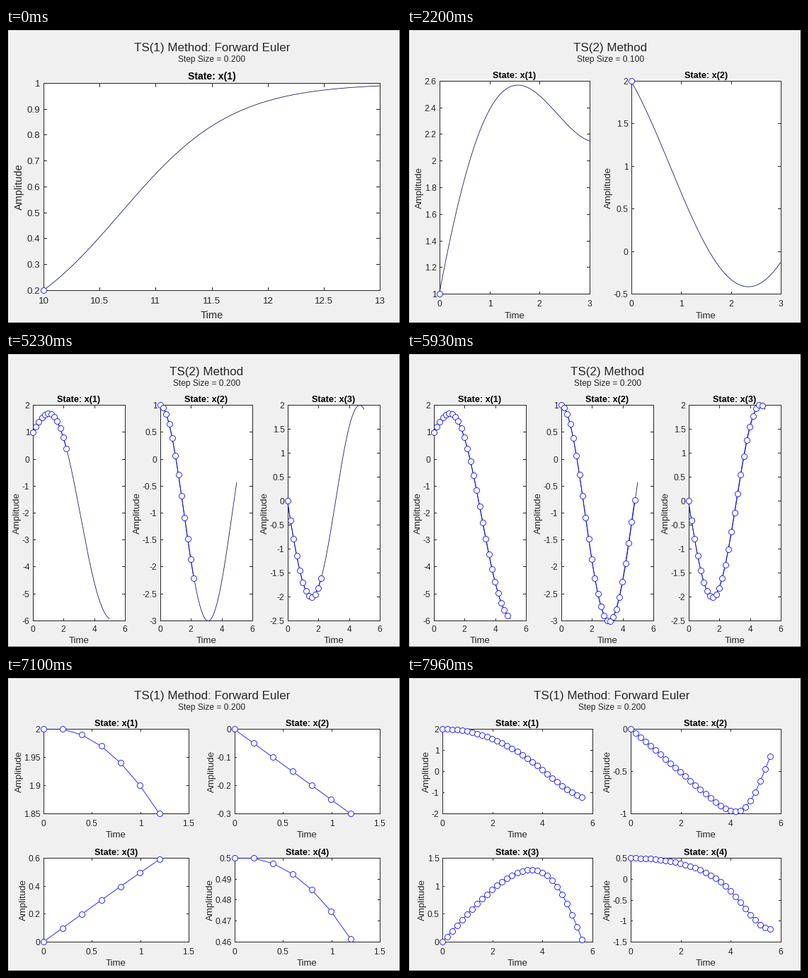
A matplotlib script that plays this animation: 558x420 px, repeating every 8 s.

```python
import math

import numpy as np
import matplotlib.pyplot as plt
from matplotlib.animation import FuncAnimation
from matplotlib.patches import Rectangle

WIDTH, HEIGHT, DPI = 558, 420, 60
PT = 72 / DPI  # points per pixel
INTERVAL, LOOP = 20, 8000
INK, BLUE, NAVY = "#262626", "#0000ff", "#0a1450"
RIGHT = 527
THIN = 0.8

plt.rcParams["font.family"] = "Liberation Sans"
fig = plt.figure(figsize=(WIDTH / DPI, HEIGHT / DPI), dpi=DPI, facecolor="black")
ax = fig.add_axes([0, 0, 1, 1])
ax.axis("off")
# Integer coordinates are pixel centres, y pointing down.
ax.set_xlim(-0.5, WIDTH - 0.5)
ax.set_ylim(HEIGHT - 0.5, -0.5)


# ---- numerical solutions -------------------------------------------------

def integrate(step, start, t0, h, count):
    states = [np.array(start, float)]
    for k in range(count):
        states.append(step(states[-1], t0 + k * h, h))
    return t0 + h * np.arange(count + 1), np.array(states).T


def logistic_step(x, t, h):
    return x + h * 2 * x * (1 - x)


def ramp_step(x, t, h):
    slope = np.array([x[1], t - x[0]])
    bend = np.array([t - x[0], 1 - x[1]])
    return x + h * slope + h * h / 2 * bend


def third_order_step(x, t, h):
    slope = np.array([x[1], x[2], -1 - x[1]])
    bend = np.array([x[2], -1 - x[1], -x[2]])
    return x + h * slope + h * h / 2 * bend


def orbit_step(s, t, h):
    x, vx, y, vy = s
    r3 = math.hypot(x, y) ** 3
    return s + h * np.array([vx, -x / r3, vy, -y / r3])


def logistic_exact(t):
    return [1 / (1 + 4 * np.exp(-2 * (t - 10)))]


def ramp_exact(t):
    return [np.cos(t) + np.sin(t) + t, 1 + np.cos(t) - np.sin(t)]


def third_order_exact(t):
    return [2 * np.sin(t) - t + 1, 2 * np.cos(t) - 1, -2 * np.sin(t)]


# ---- drawing helpers -----------------------------------------------------

def text(x, y, s, size, ha="center", **style):
    style.setdefault("color", INK)
    ax.text(x, y + 0.36 * size, s, fontsize=size * PT, ha=ha, va="baseline", **style)


def label(value):
    return f"{round(value, 8) + 0.0:g}"


def label_width(s, size):
    return size * sum({".": 0.278, "-": 0.333}.get(c, 0.556) for c in s)


def ticks(axis):
    lo, hi, step = axis
    return [lo + i * step for i in range(round((hi - lo) / step) + 1)]


def widest(axis, size):
    return max(label_width(label(v), size) for v in ticks(axis))


def nice_axis(values):
    """Limits and step with at most four intervals."""
    lo, hi = min(values), max(values)
    if hi - lo < 1e-9:
        return lo - 1, lo + 1, 0.5
    for power in range(-4, 3):
        for m in (1, 2, 5):
            step = m * 10.0 ** power
            first = math.floor(lo / step + 1e-6)
            last = math.ceil(hi / step - 1e-6)
            if last - first <= 4:
                return first * step, last * step, step


def draw_panel(box, number, xaxis, yaxis, size, offsets, points, curve=None):
    x0, y0, x1, y1 = box
    title_dy, tick_dy, xlabel_dy, ylabel_dx = offsets
    big = size * 1.1

    def px(t):
        return x0 + (np.asarray(t) - xaxis[0]) / (xaxis[1] - xaxis[0]) * (x1 - x0)

    def py(v):
        return y1 - (np.asarray(v) - yaxis[0]) / (yaxis[1] - yaxis[0]) * (y1 - y0)

    ax.add_patch(Rectangle((x0, y0), x1 - x0, y1 - y0, fc="white", ec="none"))
    tick = 0.01 * max(x1 - x0, y1 - y0)
    xs, ys = [x0, x1, x1, x0, x0], [y0, y0, y1, y1, y0]

    def segment(xa, ya, xb, yb):
        xs.extend([np.nan, xa, xb])
        ys.extend([np.nan, ya, yb])

    for t in ticks(xaxis):
        x = round(float(px(t)))
        segment(x, y1, x, y1 - tick)
        segment(x, y0, x, y0 + tick)
        text(x + 0.5, y1 + tick_dy, label(t), size)
    for v in ticks(yaxis):
        y = round(float(py(v)))
        segment(x0, y, x0 + tick, y)
        segment(x1, y, x1 - tick, y)
        text(x0 - 4, y, label(v), size, ha="right")
    ax.plot(xs, ys, color=INK, lw=PT, solid_joinstyle="miter")

    mid = (x0 + x1) / 2 + 0.5
    text(mid, y0 + title_dy, f"State: x({number})", size * 1.05,
         weight="bold", color="black")
    text(mid, y1 + xlabel_dy, "Time", big)
    ax.text(x0 - widest(yaxis, size) - ylabel_dx, (y0 + y1) / 2, "Amplitude",
            fontsize=big * PT, color=INK, rotation=90, ha="center", va="center")

    if curve is not None:
        ax.plot(px(curve[0]), py(curve[1]), color=NAVY, lw=THIN * PT)
    ax.plot(px(points[0]), py(points[1]), color=BLUE, lw=THIN * PT, marker="o",
            ms=8 * PT, mfc="white", mec=BLUE, mew=THIN * PT)


def draw_heading(left, method, h):
    mid = (left + RIGHT) / 2 + 1
    text(mid, 26, method, 17)
    text(mid, 43.5, f"Step Size = {h:.3f}", 12)


# ---- scenes --------------------------------------------------------------

EULER, TAYLOR = "TS(1) Method: Forward Euler", "TS(2) Method"


def fixed_scene(method, h, solution, exact, span, boxes, xaxis, yaxes, size, offsets):
    times, states = solution
    fine = np.linspace(*span, 200)
    curves = exact(fine)

    def draw(k):
        draw_heading(boxes[0][0], method, h)
        for i, (box, yaxis) in enumerate(zip(boxes, yaxes)):
            draw_panel(box, i + 1, xaxis, yaxis, size, offsets,
                       (times[:k + 1], states[i][:k + 1]), (fine, curves[i]))
    return draw


def orbit_scene(h=0.2, size=12):
    times, states = integrate(orbit_step, [2, 0, 0, 0.5], 0, h, 28)

    def draw(k):
        t = times[:k + 1]
        xaxis = nice_axis(t)
        yaxes = [nice_axis(s[:k + 1]) for s in states]
        widths = [widest(a, size) for a in yaxes]
        # Wide tick labels push the columns apart.
        left = round(max(49, 28.6 + max(widths[0], widths[2])))
        spill = 13 if "." in label(xaxis[1]) else 3
        gap = max(53, 29.6 + max(widths[1], widths[3]) + spill)
        width = (RIGHT - left - gap) / 2
        columns = (left, round(left + width)), (round(RIGHT - width), RIGHT)
        rows = (75, 195), (258, 377)
        draw_heading(left, EULER, h)
        for i in range(4):
            (x0, x1), (y0, y1) = columns[i % 2], rows[i // 2]
            draw_panel((x0, y0, x1, y1), i + 1, xaxis, yaxes[i], size,
                       (-9.5, 13, 29, 10.5), (t, states[i][:k + 1]))
    return draw


logistic = fixed_scene(
    EULER, 0.2, integrate(logistic_step, [0.2], 10, 0.2, 15), logistic_exact, (10, 13),
    [(52, 78, RIGHT, 372)], (10, 13, 0.5), [(0.2, 1, 0.1)],
    13.33, (-11, 14, 34, 15.5))
ramp = fixed_scene(
    TAYLOR, 0.1, integrate(ramp_step, [1, 2], 0, 0.1, 30), ramp_exact, (0, 3),
    [(45, 75, 257, 377), (316, 75, RIGHT, 377)], (0, 3, 1),
    [(1, 2.6, 0.2), (-0.5, 2, 0.5)], 12, (-9, 13, 30, 10.5))
third_order = fixed_scene(
    TAYLOR, 0.2, integrate(third_order_step, [1, 1, 0], 0, 0.2, 25), third_order_exact,
    (0, 5), [(x, 75, x + 130, 381) for x in (37, 217, 397)], (0, 6, 2),
    [(-6, 2, 1), (-3, 1, 0.5), (-2.5, 2, 0.5)], 12, (-9.5, 11.5, 26.5, 10.5))

# Each scene with its (time in ms, step number) knots; the first is its start.
SCENES = [
    (logistic, [(0, 0), (130, 1), (900, 15)]),
    (ramp, [(2200, 0), (2260, 1), (3000, 15), (3030, 16), (3800, 30)]),
    (third_order, [(4630, 0), (4690, 1), (5230, 11), (5430, 15), (5500, 16), (5960, 25)]),
    (orbit_scene(), [(6730, 0), (6900, 1), (7100, 6), (7700, 21), (7730, 22), (7960, 28)]),
]
shown = None


def update(frame):
    global shown
    now = frame * INTERVAL + INTERVAL / 2
    draw, knots = [s for s in SCENES if s[1][0][0] <= now][-1]
    k = int(np.interp(now, *zip(*knots)) + 1e-6)
    if shown != (draw, k):
        shown = (draw, k)
        for artist in [*ax.lines, *ax.texts, *ax.patches]:
            artist.remove()
        ax.add_patch(Rectangle((2.5, 2.5), WIDTH - 5, HEIGHT - 5, fc="#f0f0f0", ec="none"))
        draw(k)
    return []


anim = FuncAnimation(fig, update, frames=LOOP // INTERVAL, interval=INTERVAL,
                     init_func=lambda: [], repeat=True, repeat_delay=0, blit=False)
plt.show()
```
